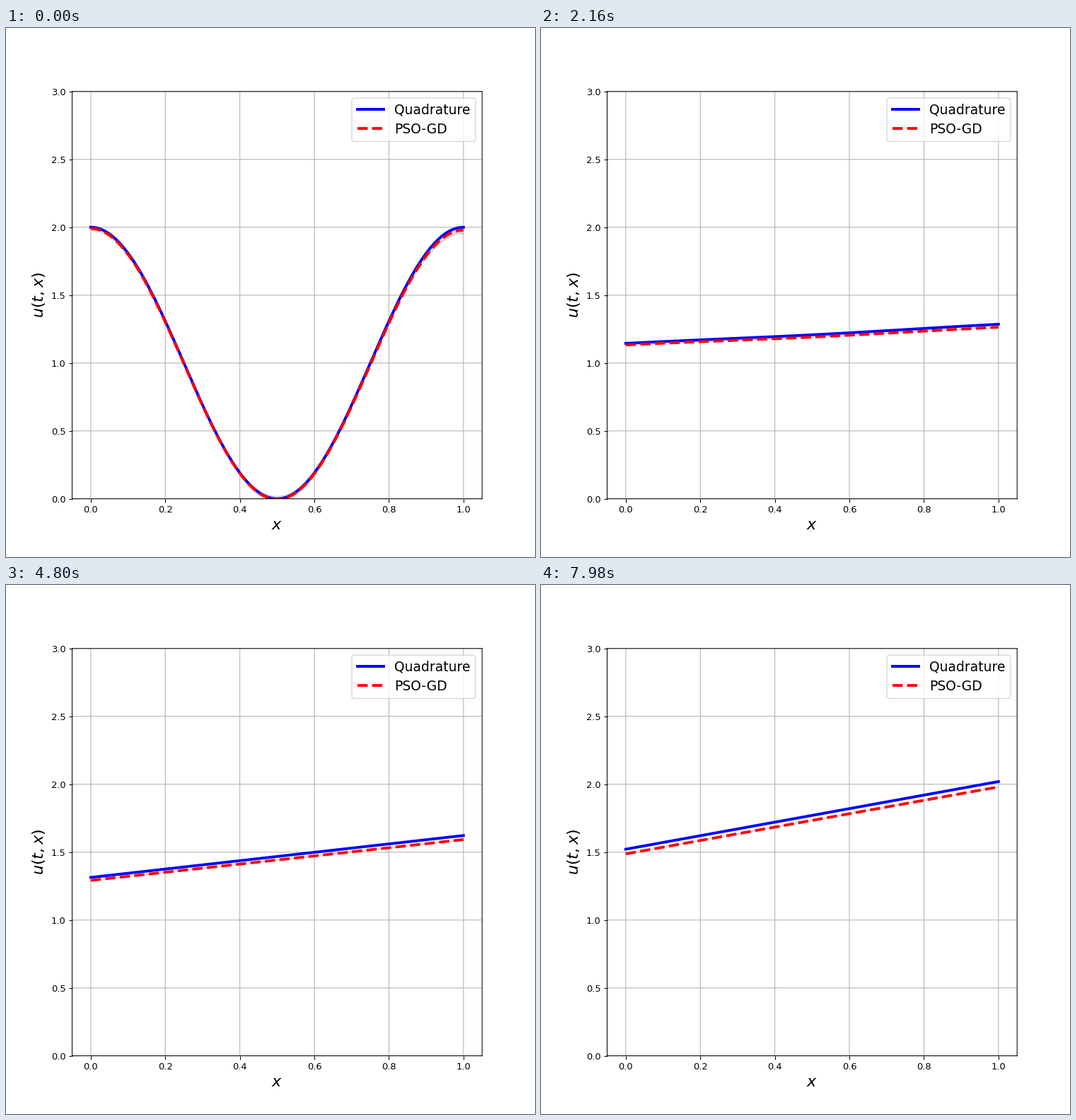
A matplotlib script for the animation above (8 s loop, 748x748 px).

```python
import numpy as np
import matplotlib.pyplot as plt
from matplotlib.animation import FuncAnimation

SIZE, DPI = 748, 93.5
TICK, LOOP, HOLD = 20, 8000, 3   # ms per frame, ms per loop, frames per step
DT = 1 / 255                     # model time per step

x = np.linspace(0, 1, 201)
wave = np.cos(2 * np.pi * x)


def decay(n):
    return np.exp(-4 * np.pi**2 * n * DT)


def exact(n):
    t = n * DT
    return 1 + t + x * np.sin(t) + decay(n) * wave


def approx(n):
    left = 0.003 + 0.000235 * n
    right = 0.0155 + 0.00018 * n
    return exact(n) - left * (1 - x) - right * x - 0.006 * decay(n) * wave


def band_outline(n):
    mid = approx(n)
    half = 0.007 + decay(n) * (0.012 + 0.012 * x) * np.abs(wave)
    xs = np.concatenate([x, x[::-1]])
    ys = np.concatenate([mid - half, (mid + half)[::-1]])
    return np.column_stack([xs, ys])


fig, ax = plt.subplots(figsize=(SIZE / DPI, SIZE / DPI), dpi=DPI)
ax.set_xlim(-0.05, 1.05)
ax.set_ylim(0, 3)
ax.set_xlabel("$x$", fontsize="xx-large")
ax.set_ylabel("$u(t,x)$", fontsize="xx-large")
ax.grid(True)

band, = ax.fill(*band_outline(0).T, color="gray", alpha=0.3, lw=0)
blue, = ax.plot(x, exact(0), "b-", lw=3, label="Quadrature")
red, = ax.plot(x, approx(0), "r--", lw=3, label="PSO-GD")
legend = ax.legend(loc="upper right", fontsize="x-large", labelspacing=0.45)

# Keep frame, grid and legend box at their true sub-pixel positions.
for part in [*ax.spines.values(), *ax.get_xgridlines(), *ax.get_ygridlines(),
             *ax.get_xticklines(), *ax.get_yticklines(), legend.get_frame()]:
    part.set_snap(False)


def update(i):
    n = i // HOLD
    band.set_xy(band_outline(n))
    blue.set_ydata(exact(n))
    red.set_ydata(approx(n))
    return band, blue, red


anim = FuncAnimation(fig, update, frames=LOOP // TICK, interval=TICK,
                     repeat=True, repeat_delay=0, blit=False)
plt.show()
```
